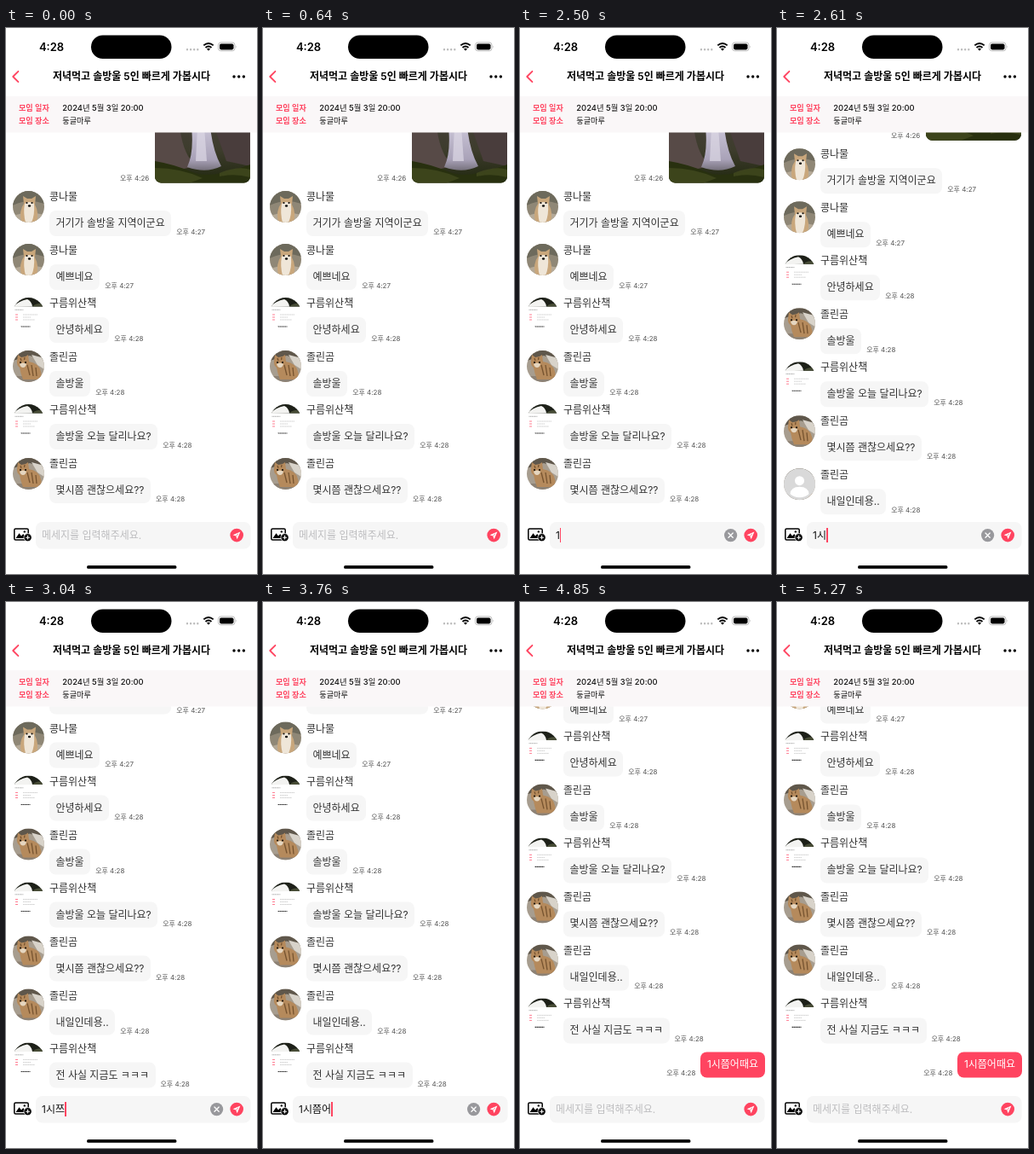
Animation of 295x640 px, one loop 8000 ms. Source, as an HTML page:

```html
<!DOCTYPE html>
<html lang="ko">
<head>
<meta charset="utf-8">
<title>Chat</title>
<style>
  html, body { margin: 0; width: 100%; height: 100%; overflow: hidden; background: #fff; }
  body, text { font-family: Inter, "Noto Sans CJK KR", "Noto Sans CJK JP", sans-serif; font-size: 12px; }
  #chrome, #clip, #list, .row, .row > *, #input, #photo { position: absolute; }
  #chrome { left: 0; top: 0; }
  #clip { left: 0; top: 122px; width: 295px; height: 452px; overflow: hidden; }
  #list { left: 0; top: -122px; width: 295px; }
  .row { left: 0; width: 295px; white-space: nowrap; color: #333; }
  .name { left: 51px; top: 0; line-height: 20px; }
  .face { left: 7.5px; top: 2.5px; }
  .line { left: 51px; top: 26px; display: flex; align-items: flex-end; gap: 6px; }
  .bubble { padding: 0 7.5px; line-height: 30px; border-radius: 7.5px; background: #f6f6f6; }
  .time { font-size: 8px; line-height: 10px; color: #555; }
  .mine .line { left: auto; right: 7.5px; top: 0; flex-direction: row-reverse; }
  .mine .bubble { background: #ff4460; color: #fff; }
  #input { left: 42px; top: 584.5px; line-height: 20px; white-space: nowrap; color: #111; }
  #hint { position: absolute; left: 0; color: #bdbdbf; }
  #caret { display: inline-block; width: 1.6px; height: 17px; vertical-align: -4px; background: #ff4460; position: relative; }
</style>
</head>
<body>
<div id="clip"><div id="list">
  <svg id="photo" style="left:175px;top:96px" width="112" height="85.5">
    <defs>
      <clipPath id="card"><rect width="112" height="85.5" rx="7.5"/></clipPath>
      <linearGradient id="fall" x2="0" y2="1"><stop stop-color="#c9c4d6"/><stop offset=".75" stop-color="#a9a2b8"/><stop offset="1" stop-color="#77727d"/></linearGradient>
      <linearGradient id="cliff" x2="0" y2="1"><stop stop-color="#48403c"/><stop offset=".55" stop-color="#3d3c2c"/><stop offset="1" stop-color="#20270f"/></linearGradient>
    </defs>
    <g clip-path="url(#card)">
      <rect width="112" height="86" fill="url(#cliff)"/>
      <path d="M0 26L30 26Q34 52 48 66L20 72L0 62Z" fill="#574a47"/>
      <path d="M72 26H112V66L84 60Z" fill="#493d3c"/>
      <path d="M43 20H65Q68 48 78 66Q60 75 38 67Q46 50 43 20Z" fill="url(#fall)"/>
      <path d="M50 20H58L61 60H48Z" fill="#ddd9e6" opacity=".7"/>
      <path d="M0 60Q24 64 44 73T112 64V86H0Z" fill="#28300f"/>
      <path d="M0 68Q30 68 56 80L40 86H0ZM76 74Q98 65 112 70V79Q94 74 76 78Z" fill="#42491f" opacity=".8"/>
    </g>
  </svg>
  <div class="row" style="top:171px"><span class="time" style="left:134px">오후 4:26</span></div>
</div></div>

<svg id="chrome" width="295" height="640">
  <!-- status bar -->
  <text x="53.5" y="26.5" text-anchor="middle" style="font-size:13px" font-weight="600">4:28</text>
  <rect x="100" y="8.5" width="94.5" height="27.5" rx="13.75"/>
  <path d="M213 25.3h13" stroke="#bbb" stroke-width="2.4" stroke-linecap="round" stroke-dasharray="0 4.1"/>
  <g fill="none" stroke="#000" stroke-width="1.9">
    <path d="M232.3 20.4Q238 15.4 243.7 20.4M234.5 23Q238 20 241.5 23"/>
  </g>
  <path d="M236 24.6Q238 23.1 240 24.6L238 26.8Z"/>
  <rect x="249.5" y="17" width="19.5" height="9.8" rx="3" fill="none" stroke="#aaa" stroke-width=".8"/>
  <rect x="251" y="18.4" width="16.5" height="7" rx="1.8"/>
  <path d="M270.3 20.4q1.4 1.5 0 3z" fill="#aaa"/>
  <!-- title bar -->
  <path d="M14.4 50.8L8.2 57L14.4 63.2" fill="none" stroke="#ff4460" stroke-width="1.8" stroke-linecap="round" stroke-linejoin="round"/>
  <text x="147.5" y="61.2" text-anchor="middle" font-weight="600">저녁먹고 솔방울 5인 빠르게 가봅시다</text>
  <g><circle cx="268" cy="57" r="1.7"/><circle cx="273.7" cy="57" r="1.7"/><circle cx="279.4" cy="57" r="1.7"/></g>
  <!-- meeting info -->
  <rect y="80" width="295" height="42.5" fill="#faf7f8"/>
  <g fill="#ff4460" font-weight="600">
    <text x="15" y="96.8" style="font-size:9.1px">모임 일자</text>
    <text x="15" y="112" style="font-size:9.1px">모임 장소</text>
  </g>
  <g fill="#111" font-weight="500">
    <text x="66.3" y="96.8" style="font-size:9.4px">2024년 5월 3일 20:00</text>
    <text x="66.3" y="112" style="font-size:9.1px">둥글마루</text>
  </g>
  <!-- input bar -->
  <rect x="35" y="579" width="252.5" height="31.5" rx="7.5" fill="#f6f6f6"/>
  <rect x="9.8" y="587" width="16.4" height="13" rx="1.5" fill="#fff" stroke="#000" stroke-width="1.5"/>
  <path d="M11.5 598L15.5 592.2L18 595.4L20.2 593L24 598Z"/>
  <circle cx="21.8" cy="590.4" r="1.2"/>
  <circle cx="25.6" cy="597.2" r="4.6" stroke="#fff" stroke-width=".8"/>
  <path d="M23.2 597.2h4.8M25.6 594.8v4.8" stroke="#fff" stroke-width="1.1"/>
  <g id="clear">
    <circle cx="247.6" cy="594.6" r="7.6" fill="#98989c"/>
    <path d="M245 592l5.2 5.2m0-5.2l-5.2 5.2" stroke="#fff" stroke-width="1.3" stroke-linecap="round"/>
  </g>
  <circle cx="271.2" cy="594.6" r="7.8" fill="#ff4460"/>
  <path d="M275.4 590.4L266.6 594.2L270.2 595.6L271.7 599.2Z" fill="#fff"/>
  <path d="M270.2 595.6L273 592.8" stroke="#ff4460" stroke-width=".7"/>
  <rect x="95" y="630" width="105.5" height="3.8" rx="1.9"/>
</svg>
<div id="input"><span id="hint">메세지를 입력해주세요.</span><span id="typed"></span><i id="caret"></i></div>

<script>
const $ = id => document.getElementById(id);
const PITCH = 62.6, LOOP = 8000;

const names = ['콩나물', '구름위산책', '졸린곰'];
const faces = [
  // dog
  `<rect width="37" height="37" fill="#8f8776"/><path d="M0 0H37V15Q18 8 0 17Z" fill="#6d6a5c"/>
   <path d="M0 29Q18 23 37 28V37H0Z" fill="#b5aa98"/>
   <path d="M10 37Q7 23 13 15L12 6L17 9H22L27 6L26 16Q31 25 28 37Z" fill="#c9a77c"/>
   <path d="M14 15Q19 11 25 15Q26 28 22 37H15Q12 26 14 15Z" fill="#efe6d8"/>
   <circle cx="16.5" cy="14" r="1"/><circle cx="22.5" cy="14" r="1"/><ellipse cx="19.5" cy="17.5" rx="1.6" ry="1.2"/>`,
  // screenshot
  `<rect width="37" height="37" fill="#fff"/><path d="M0 0H37V10.5H0Z" fill="#1d2018"/>
   <path d="M0 11Q7 4 17 2Q22 4 23 10.5Z" fill="#f3f3f1"/><path d="M23 10.5Q28 5 37 8V10.5Z" fill="#474c36"/>
   <path d="M2.5 14.3h10" stroke="#999" stroke-width=".8" stroke-dasharray="1.2 .4"/>
   <path d="M3 20h3M3 23h3M3 26h3" stroke="#ff7087" stroke-width=".9"/>
   <path d="M12 20h17M12 23h9M12 26h14" stroke="#c4c4c4" stroke-width=".8" stroke-dasharray="1.5 .5"/>
   <path d="M9.5 34h11" stroke="#333" stroke-width="1.1" stroke-dasharray="1.6 .4"/>`,
  // cat
  `<rect width="37" height="37" fill="#a79d8f"/><path d="M0 0H37V12L20 6L0 12Z" fill="#5f574b"/>
   <path d="M22 5L37 9V22L29 17Z" fill="#d8d3ca"/><path d="M0 30H37V37H0Z" fill="#8d8275"/>
   <path d="M5 12L6 5L10 8L15 7L18 5L19 13Q31 15 33 25Q35 31 30 34H12Q9 27 8 20Q4 17 5 12Z" fill="#b58a5c"/>
   <path d="M17 17L20 29M22 17L24 30M27 20L28 30M9 9l1 3M14 8l-.5 3" stroke="#76532f" stroke-width="1.3"/>
   <path d="M8 16Q12 13 16 16Q15 20 12 20T8 16Z" fill="#e5d6c0"/>
   <circle cx="9" cy="14" r="1"/><circle cx="15" cy="14" r="1"/>`
];
const blank = `<rect width="37" height="37" fill="#d9d9d9"/><circle cx="18.5" cy="14.5" r="5.5" fill="#fff"/>
  <path d="M7.5 30Q8 21.5 18.5 21.5T29.5 30Q25 34 18.5 34T7.5 30Z" fill="#fff"/>`;

const messages = [
  [0, '거기가 솔방울 지역이군요', 27], [0, '예쁘네요', 27], [1, '안녕하세요', 28],
  [2, '솔방울', 28], [1, '솔방울 오늘 달리나요?', 28], [2, '몇시쯤 괜찮으세요??', 28],
  [2, '내일인데용..', 28], [1, '전 사실 지금도 ㅋㅋㅋ', 28]
];

function addRow(top, html, cls = '') {
  const row = document.createElement('div');
  row.className = 'row ' + cls;
  row.style.top = top + 'px';
  row.innerHTML = html;
  $('list').append(row);
  return row;
}
const line = (text, min) =>
  `<div class="line"><span class="bubble">${text}</span><span class="time">오후 4:${min}</span></div>`;
const face = art =>
  `<svg class="face" width="37" height="37" style="border-radius:50%">${art}</svg>`;

const rows = messages.map(([who, text, min], i) => addRow(188 + PITCH * i,
  face(faces[who]) + face(blank) + `<div class="name">${names[who]}</div>` + line(text, min)));
rows.push(addRow(691.6, line('1시쯤어때요', 28), 'mine'));

// Each track is a list of [start time, value]; values hold until the next one.
const scroll = [[0, 0], [2610, 49.8], [2940, 112.5], [4850, 164.6]];
const typing = [[0, ''], [2390, '1'], [2610, '1시'], [2840, '1시ㅉ'], [3040, '1시쯔'], [3230, '1시쯤'],
  [3640, '1시쯤ㅇ'], [3760, '1시쯤어'], [3870, '1시쯤어ㄸ'], [4380, '1시쯤어때'],
  [4500, '1시쯤어때ㅇ'], [4620, '1시쯤어때요'], [4850, '']];
const arrive = { 6: 2610, 7: 2940, 8: 4850 }, loaded = { 6: 2840, 7: 3040 };

const at = (track, t) => track.findLast(([start]) => start <= t)[1];
const show = (el, on) => el.style.visibility = on ? 'visible' : 'hidden';

function draw(t) {
  $('list').style.transform = `translateY(${-at(scroll, t)}px)`;
  rows.forEach((row, i) => {
    const here = t >= (arrive[i] ?? 0);
    show(row, here);
    const cover = row.querySelectorAll('.face')[1];
    if (cover) show(cover, here && t < (loaded[i] ?? 0));
  });
  const text = at(typing, t);
  $('typed').textContent = text;
  show($('hint'), !text);
  show($('clear'), text);
  show($('caret'), t >= 1220 && t < 4850);
}

const begin = performance.now();
function tick() {
  draw((performance.now() - begin) % LOOP);
  requestAnimationFrame(tick);
}
tick();
</script>
</body>
</html>
```
